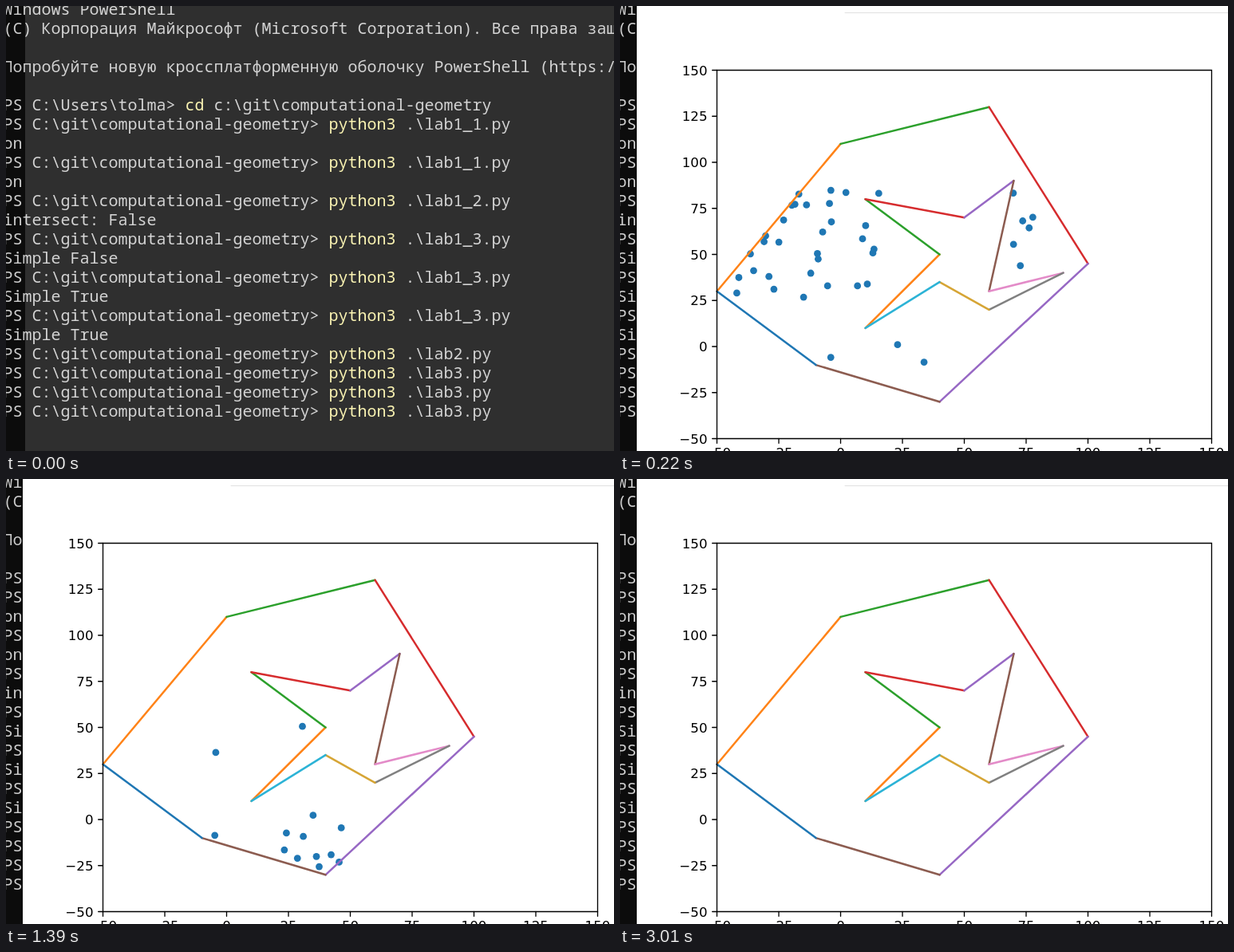
Write an HTML page that moves like this. It is 762x558 px and loops after 3.77 s.

```html
<!DOCTYPE html>
<html lang="ru">
<head>
<meta charset="utf-8">
<style>
html, body { margin: 0; width: 100%; height: 100%; overflow: hidden; background: #0c0c0c; }
svg { display: block; width: 100vw; height: 100vh; }
#term { font: 500 20px "Noto Sans Mono", "DejaVu Sans Mono", monospace; fill: #ccc; }
#term text { white-space: pre; }
#term .cmd { fill: #f9f1a5; }
#win { font: 16.67px "DejaVu Sans", sans-serif; }
</style>
</head>
<body>
<svg viewBox="0 0 762 558"><g id="term"></g><g id="win"></g></svg>
<script>
const LOOP = 3770, FIRST = 62, FRAME = 77.4, LAST = 39;
const term = document.getElementById('term');
const win = document.getElementById('win');

// Terminal: "|" surrounds the highlighted command.
const prompt = 'PS C:\\git\\computational-geometry> ';
const run = file => `${prompt}|python3| .\\${file}.py`;
const rows = [
  'Windows PowerShell',
  '(C) Корпорация Майкрософт (Microsoft Corporation). Все права защищены.',
  '',
  'Попробуйте новую кроссплатформенную оболочку PowerShell (https://aka.ms/pscore6)',
  '',
  'PS C:\\Users\\tolma> |cd| c:\\git\\computational-geometry',
  run('lab1_1'), 'on', run('lab1_1'), 'on',
  run('lab1_2'), 'intersect: False',
  run('lab1_3'), 'Simple False',
  run('lab1_3'), 'Simple True',
  run('lab1_3'), 'Simple True',
  run('lab2'), run('lab3'), run('lab3'), run('lab3')
];
term.innerHTML = rows.map((row, i) => {
  let column = 0;
  return row.split('|').map((part, k) => {
    const x = 12 * column - 3.5;
    column += part.length;
    return `<text x="${x}" y="${11 + 24 * i}"${k === 1 ? ' class="cmd"' : ''}>${part.replace('>', '&gt;')}</text>`;
  }).join('');
}).join('');

// Polygons in data units; edge i of each runs from vertex i to the next one.
const colors = ['#1f77b4', '#ff8318', '#2ca02c', '#d62c2e', '#9768c4',
  '#8c5c50', '#e38bc8', '#808080', '#d6a535', '#2cb3d6'];
const edgesOf = (poly, outer) => poly.map((a, i) => ({
  a, b: poly[(i + 1) % poly.length], outer,
  color: colors[outer ? (i + 1) % 6 : i + 1]
}));
const edges = [
  ...edgesOf([[-50, 30], [0, 110], [60, 130], [100, 45], [40, -30], [-10, -10]], true),
  ...edgesOf([[10, 10], [40, 50], [10, 80], [50, 70], [70, 90], [60, 30], [90, 40], [60, 20], [40, 35]], false)
];

const cross = (p, q) => p[0] * q[1] - p[1] * q[0];
const minus = (p, q) => [p[0] - q[0], p[1] - q[1]];
const along = (p, v, s) => [p[0] + v[0] * s, p[1] + v[1] * s];

// Points bounce off the outer polygon and vanish at the inner one.
function travel(p, steps) {
  if (steps > 70) return null;
  let v = [-5.66, 2.34];
  for (;;) {
    let hit = null, first = steps;
    for (const edge of edges) {
      const e = minus(edge.b, edge.a), d = minus(edge.a, p), k = cross(v, e);
      const s = cross(d, e) / k, u = cross(d, v) / k;
      if (s > 1e-6 && s < first && u >= 0 && u <= 1) { first = s; hit = edge; }
    }
    p = along(p, v, first);
    if (!hit) return p;
    if (!hit.outer) return null;
    steps -= first;
    const e = minus(hit.b, hit.a);
    const k = 2 * (v[0] * e[0] + v[1] * e[1]) / (e[0] ** 2 + e[1] ** 2);
    v = [k * e[0] - v[0], k * e[1] - v[1]];
  }
}

// Between the polygons a ray to the right meets an odd number of edges.
const between = ([x, y]) => edges.filter(({ a, b }) =>
  (a[1] > y) !== (b[1] > y) && x < a[0] + (y - a[1]) / (b[1] - a[1]) * (b[0] - a[0])
).length % 2 === 1;

let seed = 11;
const random = (lo, hi) => lo + (hi - lo) * (seed = seed * 16807 % 2147483647) / 2147483647;

// Long-lived points are placed; the rest are scattered and vanish early.
const points = [
  [-29.9, 47.6], [-40.6, 38.5], [-28.6, 38.5], [-22.4, 35.3], [-20.4, 28.4],
  [-35.4, 26.3], [-8.4, 24.1], [-5.5, 37.1], [1.3, 30.2], [13.4, 30.2],
  [29.6, -1.7], [2.6, -8.6], [40.3, -11.2]
];
function scatter(count, left, right, low, high) {
  while (count) {
    const p = [random(left, right), random(low, high)];
    if (between(p) && !travel(p, 23)) { points.push(p); count--; }
  }
}
scatter(21, -25, 22, 30, 93);
scatter(8, 70, 85, 40, 90);

const line = (x1, y1, x2, y2, color, width) =>
  `<path d="M${x1} ${y1}L${x2} ${y2}" stroke="${color}" stroke-width="${width}" stroke-linecap="round"/>`;

function plot(scale, steps) {
  const left = 121.5, top = 80.5;
  const right = left + 620 * scale, bottom = top + 462 * scale;
  const X = x => left + (x + 50) * 3.1 * scale;
  const Y = y => bottom - (y + 50) * 2.31 * scale;
  let out = '';
  for (const p of points) {
    const q = travel(p, steps);
    if (q) out += `<circle cx="${X(q[0])}" cy="${Y(q[1])}" r="4.4" fill="${colors[0]}"/>`;
  }
  for (const { a, b, color } of edges) out += line(X(a[0]), Y(a[1]), X(b[0]), Y(b[1]), color, 2.5);
  out += `<path d="M${left} ${top}H${right}V${bottom}H${left}Z" fill="none" stroke="#000" stroke-width="1.33"/>`;
  for (let n = -50; n <= 150; n += 25) {
    const label = String(n).replace('-', '\u2212');
    out += line(left - 5.8, Y(n), left, Y(n), '#000', 1.33)
      + line(X(n), bottom, X(n), bottom + 5.8, '#000', 1.33)
      + `<text x="${left - 12}" y="${Y(n) + 6}" text-anchor="end">${label}</text>`
      + `<text x="${X(n)}" y="${bottom + 23.8}" text-anchor="middle">${label}</text>`;
  }
  return out;
}

// The window fades in over the first frames; its plot appears in the third.
function render(frame) {
  const x = Math.max(21, 24 - 2 * frame);
  let html = `<rect x="${x}" width="${762 - x}" height="558" fill="#fff"/>`;
  if (frame > 1) {
    const n = frame - 2;
    const steps = n * (1.14 + 0.0213 * n);
    html += line(282, 8.5, 762, 8.5, '#e0e0e0', 1) + plot(n ? 1 : 0.9927, steps);
  }
  win.setAttribute('opacity', Math.min(1, 0.144 + 0.354 * frame));
  win.innerHTML = html;
}

let shown = -1;
const begin = performance.now();
function tick() {
  const t = (performance.now() - begin) % LOOP;
  const frame = Math.min(LAST, Math.floor((t - FIRST) / FRAME) + 1);
  if (frame !== shown) render(shown = frame);
  requestAnimationFrame(tick);
}
tick();
</script>
</body>
</html>
```
